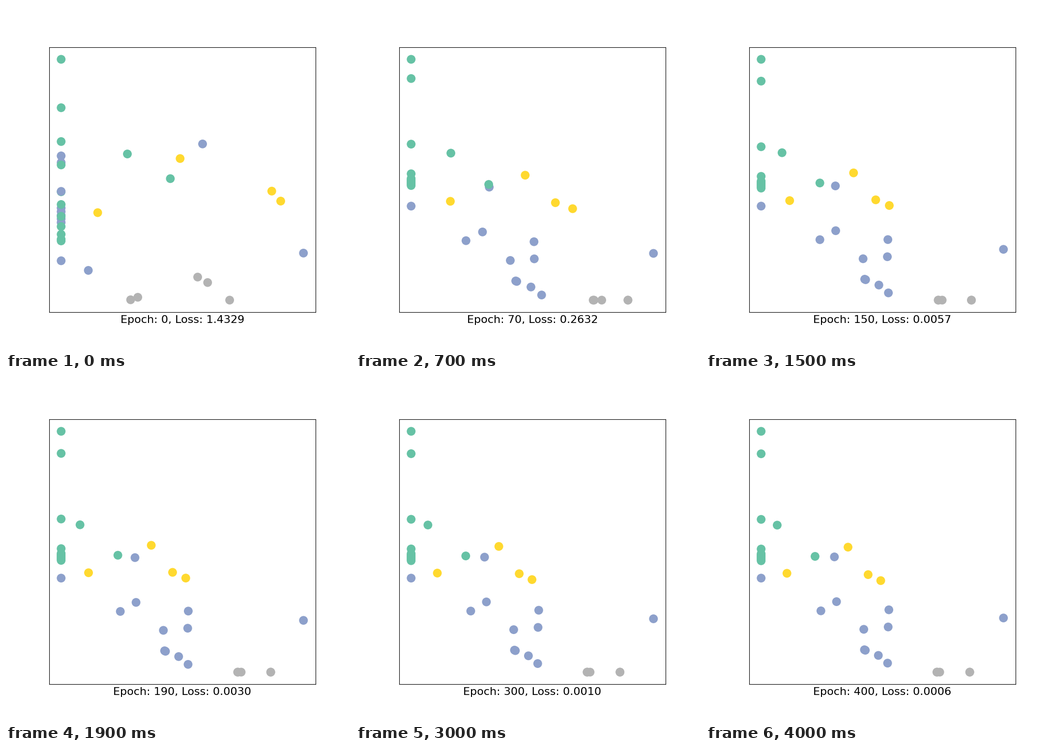
A matplotlib script that plays this animation: 700x700 px, repeating every 4.1 s.

```python
import numpy as np
import matplotlib.pyplot as plt
from matplotlib.animation import FuncAnimation

FRAMES, INTERVAL = 41, 100
TURN = 4  # step where the dots stop spreading out and start to settle
LEFT, RIGHT, TOP, BOTTOM = 112.2, 605.3, 108.5, 598.5  # extent of the dots
GREEN, BLUE, YELLOW, GRAY = "#66c2a5", "#8da0cb", "#ffd92f", "#b3b3b3"

step = np.arange(FRAMES)
settling = np.maximum(step, TURN)
lead = np.minimum(step / TURN, 1)[:, None, None]
fade = 1 / (1 + ((settling - TURN) / 2.25) ** 1.4)
fade = ((fade - fade[-1]) / (1 - fade[-1]))[:, None, None]
creep = (np.sqrt(step[-1] / settling) - 1)[:, None, None]


def column(ys):
    return [(LEFT, y) for y in ys]


def travel(start, end, swing, lift=0, sag=0):
    """Paths from start to a swung-out point, then settling on end.

    swing and lift are the x and y offsets that fade; sag is a slow y drift.
    Each is a number or a function of the end position (x from the left edge).
    """
    start, end = np.array(start), np.array(end)
    x, y = end[:, 0] - LEFT, end[:, 1]

    def value(rule):
        return rule(x, y) if callable(rule) else np.full(len(x), rule)

    offset = np.stack([value(swing), value(lift)], axis=1)
    drift = np.stack([0 * x, value(sag)], axis=1)
    path = np.clip(end + fade * offset + creep * drift,
                   (LEFT, TOP), (RIGHT, BOTTOM))
    return start + (path - start) * lead


def ripple(x, y):
    return -26 * np.cos(2 * np.pi * (y - 480) / 250)


def in_x(slope):
    return lambda x, y: slope * x


blue = travel(
    [(400, 280.7), (167.5, 538)]
    + column([305, 318.5, *np.linspace(411, 440.5, 5), 518.4]),
    [(261.3, 364), (369.5, 580.2), (265.6, 455.1), (233.8, 473.8),
     (372.1, 471.7), (321.1, 511.4), (370.7, 506.6), (322.4, 553),
     (324.2, 554), (350.7, 564.5)],
    ripple, sag=in_x(0.022))

blue_edge = travel([(RIGHT, 502.8), (LEFT, 377.2)],
                   [(RIGHT, 488.3), (LEFT, 407.2)], 0, sag=in_x(0.022))

spread = np.sin(np.linspace(0, np.pi / 2, 7))
green_edge = travel(
    column([TOP, 207, 275.8, 323.4, *(378 + 100 * spread)]),
    column([TOP, 154.2, 287.7, 348, *np.linspace(357.7, 371.9, 7)]),
    0, lift=-17)

green = travel([(247, 301.1), (334.4, 351.3)],
               [(144.9, 299.4), (221.9, 363)],
               124, lift=in_x(0.27), sag=in_x(-0.075))

yellow = travel(
    [(186.6, 420.5), (354.3, 310.4), (540.8, 376.7), (559, 397)],
    [(164.7, 397.4), (289, 344.2), (329.9, 400.1), (355.6, 412.3)],
    lambda x, y: 32 + 0.75 * x + 0.4 * (y - 400),
    lift=in_x(0.27), sag=in_x(-0.075))

gray = travel(
    [(253.6, 597.8), (268.2, 592.7), (390, 551.6), (410.3, 562.7),
     (455.1, BOTTOM)],
    [(x, BOTTOM) for x in (469.8, 470.3, 475.6, 536.7, 536.7)],
    lambda x, y: np.array([33, 36, 63, 43, 43]))

groups = [(blue, BLUE), (green_edge, GREEN), (green, GREEN),
          (blue_edge, BLUE), (yellow, YELLOW), (gray, GRAY)]
paths = np.concatenate([path for path, _ in groups], axis=1)
colors = [color for path, color in groups for _ in range(path.shape[1])]


def loss(k):
    """Speeding fall at first, then a power-law tail."""
    if k < 11:
        return 1.4329 * (0.8615 / 1.4329) ** ((k / TURN) ** 2.15)
    return (2.39 * k - 14.95) ** -1.7


fig, ax = plt.subplots(figsize=(7, 7), dpi=100)
ax.set_position([0.125, 0.11, 0.775, 0.77])
ax.set(xticks=[], yticks=[], xlim=(87.5, 630), ylim=(623, 84))
dots = ax.scatter(*paths[0].T, s=140, c=colors)
label = ax.set_xlabel("", fontsize=16, family="DejaVu Sans")


def update(frame):
    dots.set_offsets(paths[frame])
    label.set_text(f"Epoch: {frame * 10}, Loss: {loss(frame):.4f}")
    return dots, label


anim = FuncAnimation(fig, update, frames=FRAMES, interval=INTERVAL,
                     repeat=True, repeat_delay=0)
plt.show()
```
